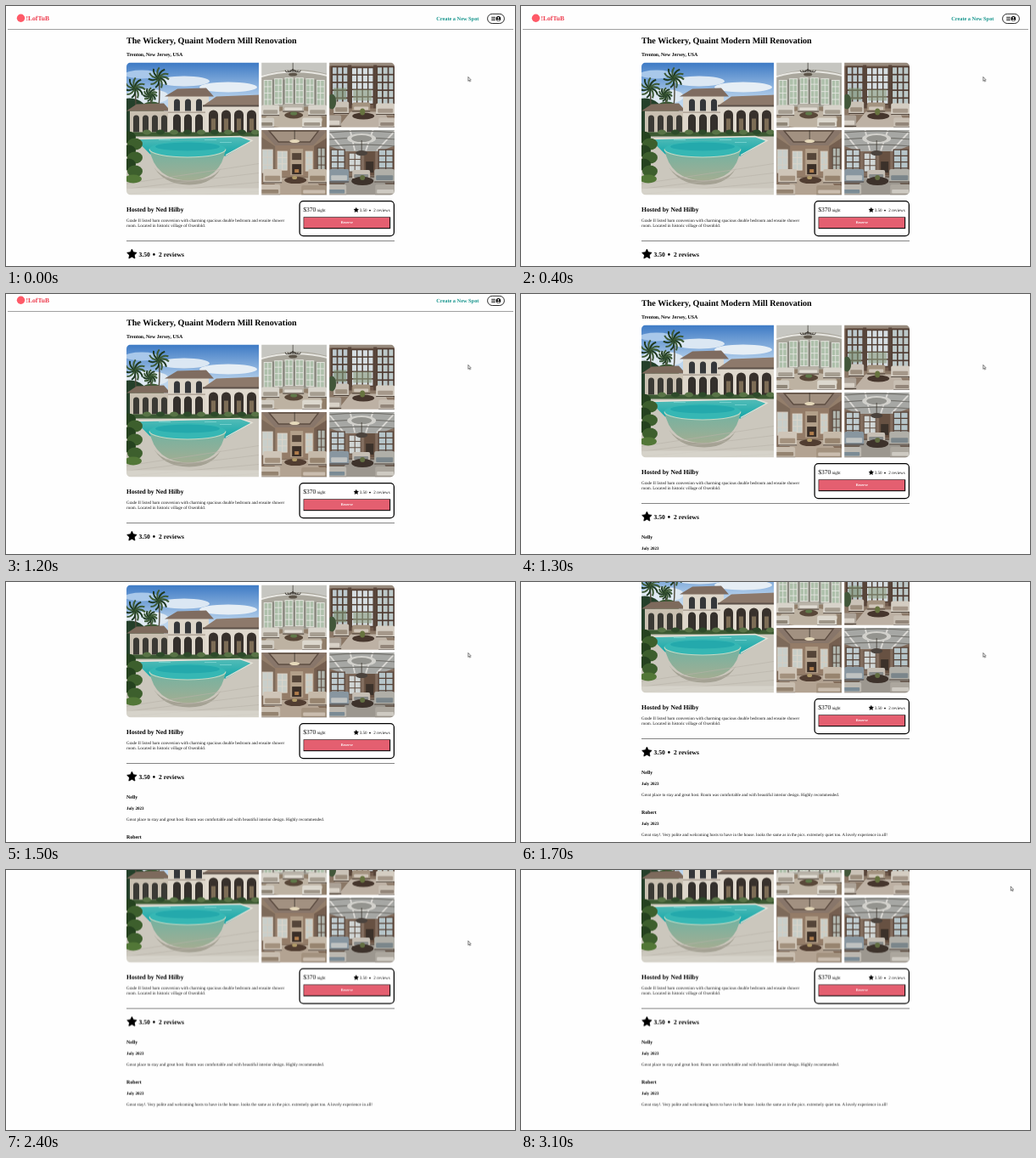
These frames come from a looping animation (600x306 px, 3.2 s). An HTML page:

```html
<!DOCTYPE html>
<html lang="en">
<head>
<meta charset="utf-8">
<title>Spot details</title>
<style>
  html, body { margin: 0; width: 100%; height: 100%; overflow: hidden; background: #fefefe; }
  svg { display: block; }
  text { font-family: "Liberation Serif", "Times New Roman", serif; text-rendering: geometricPrecision; white-space: pre; }
  .b { font-weight: bold; }
</style>
</head>
<body>
<script>
const LOOP = 3200;
const REM = 5.06;
const H1 = REM * 2, H2 = REM * 1.5, H3 = REM * 1.17;

const rect = (x, y, w, h, fill, extra = '') =>
  `<rect x="${x}" y="${y}" width="${w}" height="${h}" fill="${fill}" ${extra}/>`;
const oval = (x, y, rx, ry, fill) => `<ellipse cx="${x}" cy="${y}" rx="${rx}" ry="${ry}" fill="${fill}"/>`;
const path = (d, fill, extra = '') => `<path d="${d}" fill="${fill}" ${extra}/>`;
const line = (d, color, width = 1) => path(d, 'none', `stroke="${color}" stroke-width="${width}"`);
const text = (x, y, size, str, fill = '#111', cls = '') =>
  `<text x="${x}" y="${y}" font-size="${size}" fill="${fill}" class="${cls}">${str}</text>`;
const bold = (x, y, size, str, fill = '#000') => text(x, y, size, str, fill, 'b');
const repeat = (n, fn) => Array.from({ length: n }, (_, i) => fn(i)).join('');

function star(cx, cy, r) {
  const points = Array.from({ length: 10 }, (_, i) => {
    const a = i * Math.PI / 5 - Math.PI / 2, d = i % 2 ? r * 0.5 : r;
    return `${(cx + d * Math.cos(a)).toFixed(2)},${(cy + d * Math.sin(a)).toFixed(2)}`;
  });
  return `<polygon points="${points.join(' ')}" stroke="#000" stroke-width="${r * 0.14}" stroke-linejoin="round"/>`;
}

function panes(x, y, w, h, cols, rows, glass, frame, width = 1) {
  return rect(x, y, w, h, glass, `stroke="${frame}" stroke-width="${width}"`) +
    repeat(cols - 1, i => line(`M${x + w * (i + 1) / cols} ${y}v${h}`, frame, width)) +
    repeat(rows - 1, i => line(`M${x} ${y + h * (i + 1) / rows}h${w}`, frame, width));
}

const arch = (x, y, w, h, fill) =>
  path(`M${x} ${y + h}v${w / 2 - h}a${w / 2} ${w / 2} 0 0 1 ${w} 0v${h - w / 2}z`, fill);
const palm = (x, y, r, base) => line(`M${x} ${y}Q${x + 2} ${(y + base) / 2} ${x} ${base}`, '#4f4a3c', 1.4) +
  repeat(11, i => `<path d="M0 0Q${r * .6} -3 ${r} 2" transform="translate(${x} ${y}) rotate(${i * 33})"
    fill="none" stroke="${i % 2 ? '#1f3a22' : '#3d5a36'}" stroke-width="2"/>`);
const sofa = (x, y, w, h, fill, seat) =>
  rect(x, y, w, h, fill, 'rx="2"') + rect(x + 2, y + h * .45, w - 4, h * .35, seat, 'rx="1"') +
  rect(x, y + h * .9, w, 1, '#4a3d34');
const photo = (x, y, w, h, art) =>
  `<svg x="${x}" y="${y}" width="${w}" height="${h}"><g filter="url(#soft)">${art}</g></svg>`;

const villa = () =>
  rect(-3, -3, 162, 162, 'url(#sky)') +
  oval(18, 14, 20, 5, '#a9c8ea') + oval(68, 22, 30, 6, '#dbe7f3') + oval(120, 29, 34, 6, '#e6eef5') + oval(24, 40, 26, 9, '#dfe9f2') +
  oval(4, 62, 22, 20, '#24402a') + oval(30, 57, 14, 11, '#3a5833') +
  palm(10, 30, 12, 70) + palm(38, 18, 12, 52) + palm(28, 38, 8, 60) +
  rect(4, 57, 48, 28, '#c9c0b1') + path('M0 57L12 49 44 48 52 57z', '#7d6a5c') +
  repeat(4, i => arch(8 + i * 11, 62, 7, 20, '#3b3a35')) +
  rect(49, 38, 48, 47, '#ddd6ca') + path('M45 40L60 31 94 30 103 40z', '#7f6c60') +
  repeat(3, i => arch(56 + i * 13, 43, 7, 14, '#35373a') + arch(55 + i * 13, 61, 9, 24, '#34302c')) +
  rect(49, 58, 48, 1.4, '#aba094') +
  rect(93, 50, 66, 36, '#e0d9ce') + path('M90 51L106 40 159 38 159 51z', '#8d796b') +
  rect(90, 50, 69, 2, '#5c5049') +
  repeat(4, i => arch(97 + i * 15, 56, 11, 30, '#38312c') + rect(100 + i * 15, 66, 5, 14, '#7d6d56')) +
  rect(-3, 85, 162, 76, '#cbc7bd') + rect(-3, 82, 162, 5, '#3d5a33') +
  repeat(9, i => oval(24 + i * 16, 82, 5, 3, i % 2 ? '#2d4a2a' : '#587346')) +
  path('M10 90L134 87 148 92 117 110 28 108z', 'url(#water)') +
  line('M10 90L134 87 148 92 117 109', '#e6e2d8', 1.4) +
  repeat(5, i => line(`M${38 + i * 18} ${91 + i % 3 * 3}h14`, '#7ed6d3', .8)) +
  path('M27 101Q33 138 73 139Q112 138 117 101z', 'url(#tile)') +
  oval(72, 102, 45, 9.5, '#36b7b4') + oval(72, 99, 38, 5, '#24a9ac') +
  line('M27 102A45 9.5 0 0 0 117 102', '#c5d9c4', 1.2) +
  path('M30 119Q42 144 74 144Q104 144 114 119Q107 139 73 139Q39 139 30 119z', '#a5a294') +
  repeat(4, i => line(`M-2 ${143 + i * 6}L156 ${119 + i * 11}`, '#b8b3a8', .6)) +
  rect(-3, 148, 162, 12, '#dcd9d0', 'opacity=".7"') +
  repeat(6, i => oval(2 + i % 2 * 8, 88 + i * 8, 9, 7, i % 2 ? '#3d5f2d' : '#25421f')) +
  oval(8, 137, 10, 5, '#527737');

const sunroom = () =>
  rect(-3, -3, 84, 84, '#aaa79d') + path('M-2 -2H80V14Q38 2 -2 16z', '#c6c6c1') +
  line('M-2 17Q38 5 80 16', '#e8e7e2', 2) +
  repeat(6, i => panes(3 + i * 12.4, 22 - Math.sin((i + .5) * Math.PI / 6) * 4, 9, 30, 2, 4, '#aec0ab', '#e4e5df', .9)) +
  repeat(5, i => rect(12.8 + i * 12.4, 20, 2.2, 31, '#8a8980')) +
  line('M37 -2V9', '#4a4640', .8) +
  repeat(7, i => line(`M37 8Q${28 + i * 3} 14 ${28 + i * 3} 9`, '#4a4640', 1)) + oval(37, 14, 5, 2, '#5d554a') +
  rect(-3, 52, 84, 29, '#917f6b') + oval(38, 67, 34, 11, '#bdb2a2') +
  sofa(0, 50, 21, 13, '#d7d3ca', '#a59d91') + sofa(55, 50, 22, 13, '#d7d3ca', '#a59d90') +
  sofa(25, 49, 25, 9, '#b9b3a8', '#e0dcd3') +
  oval(38, 62, 11, 4, '#594839') + oval(38, 60, 4, 2, '#5f7849') +
  sofa(-3, 65, 18, 12, '#d0cbc1', '#8f8678') + sofa(48, 65, 23, 12, '#dcd8ce', '#a0978a');

const greatRoom = () =>
  rect(-3, -3, 84, 84, '#705a4c') + rect(-3, -3, 84, 7, '#978a7d') +
  panes(3, 5, 19, 46, 3, 5, '#bdc9ce', '#523f34', 1.7) + panes(26, 6, 26, 43, 4, 5, '#d6dee2', '#523f34', 1.5) +
  panes(56, 5, 20, 46, 3, 5, '#bcc8c8', '#503d33', 1.7) +
  rect(5, 30, 15, 14, '#7c8f70', 'opacity=".6"') + rect(28, 32, 22, 13, '#8c9d80', 'opacity=".6"') +
  rect(22, 3, 4, 52, '#58453a') + rect(52, 3, 4, 52, '#58453a') +
  rect(-3, 54, 84, 27, '#8a7766') + path('M8 79L25 58H65L75 79z', '#bdb1a4') +
  sofa(5, 46, 18, 15, '#cac2b7', '#9c8e7e') + sofa(55, 48, 22, 14, '#d4cdc2', '#a5988a') +
  sofa(27, 47, 21, 11, '#a39380', '#cfc5b9') + oval(40, 63, 13, 4, '#46362d') +
  sofa(-3, 62, 17, 14, '#aba196', '#d8d1c7') + sofa(58, 65, 20, 12, '#c8bfb3', '#93867a') +
  oval(39, 58, 3, 4, '#67733f') + oval(3, 46, 5, 9, '#42573a');

const lounge = () =>
  rect(-3, -3, 84, 84, '#937e6b') + path('M-2 -2H80L61 18H16z', '#88766a') +
  path('M9 1H67L57 14H20z', '#a29181') + line('M9 1H67L57 14H20z', '#5d4d42', 1.5) +
  rect(16, 18, 46, 36, '#947c68') + path('M-2 7L16 19V53L-2 62z', '#7d6a5a') + path('M80 7L62 19V53L80 62z', '#755f50') +
  panes(1, 23, 12, 27, 2, 3, '#c9cfcb', '#d5cdc2') + panes(19, 25, 11, 22, 2, 3, '#c8cec8', '#dcd5ca') +
  rect(34, 22, 15, 31, '#b3a08a') + rect(36, 27, 11, 8, '#554539') + rect(36, 40, 11, 12, '#3a2e27') +
  rect(39, 46, 5, 4, '#b07d4c') + panes(52, 25, 8, 23, 2, 3, '#c9cfc9', '#d6ccbe') +
  panes(66, 21, 9, 30, 2, 3, '#b0b5ad', '#57453a') + line('M39 0V12', '#3e352e', .8) + oval(39, 13, 6, 2, '#e5d8ba') +
  rect(-3, 55, 84, 26, '#826c5a') + path('M0 79L23 56H61L79 79z', '#b3a392') +
  sofa(2, 46, 22, 17, '#cfc5b8', '#a3917e') + sofa(55, 46, 22, 17, '#c5b9a9', '#97846f') +
  oval(40, 59, 13, 4, '#513d31') + oval(39, 56, 3, 2, '#b09a68') +
  sofa(-4, 64, 26, 13, '#c8bdaf', '#948370') + sofa(47, 65, 30, 12, '#a3927f', '#cabdaf');

const denRoom = () =>
  rect(-3, -3, 84, 84, '#826d5e') + path('M-2 -2H80V17L60 25H16L-2 18z', '#a6a7a4') +
  repeat(4, i => line(`M${-4 + i * 28} -2L${17 + i * 13} 24`, '#dcdad6', 1.8)) +
  repeat(3, i => line(`M-2 ${3 + i * 8}Q39 ${-1 + i * 8} 80 ${3 + i * 8}`, '#74736e', 1.2)) +
  oval(38, 10, 17, 6, '#d2d1cc') + oval(38, 10, 12, 4, '#94948f') +
  panes(2, 23, 16, 29, 2, 4, '#bfcbcf', '#574439', 1.3) + panes(23, 27, 14, 22, 2, 3, '#d0d5d4', '#604b3e') +
  rect(41, 25, 13, 28, '#675142') + rect(43, 37, 9, 13, '#3b312a') +
  panes(58, 23, 17, 29, 2, 4, '#b6c5c9', '#574439', 1.3) + line('M38 12V26', '#3b362f', .8) +
  oval(38, 27, 7, 3, '#4b433d') + rect(-3, 54, 84, 26, '#6c5e53') + path('M6 80L23 56H62L75 80z', '#9c978f') +
  sofa(0, 46, 23, 16, '#8896a0', '#bfc2c1') + sofa(53, 46, 24, 16, '#b0afa8', '#7b868b') +
  sofa(27, 47, 21, 11, '#c5beb4', '#888b8a') + oval(39, 60, 13, 5, '#3d322b') +
  sofa(-4, 64, 24, 13, '#bcb8b0', '#7b8b95') + sofa(54, 64, 24, 13, '#aca79e', '#cecac2') + oval(39, 56, 3, 3, '#626e42');

const header = `
  <circle cx="17.5" cy="14.3" r="4.7" fill="#ff5a68"/>
  ${bold(23.5, 17.2, H2, '!LofTuB', '#ee3b4d')}
  ${bold(507.2, 17.3, REM * 1.25, 'Create a New Spot', '#16958d')}
  ${rect(567.6, 9.3, 19.8, 11.2, '#fff', 'rx="5.6" stroke="#222" stroke-width=".95"')}
  ${repeat(3, i => rect(572.2, 12.8 + i * 1.8, 4.6, .8, '#000'))}
  <circle cx="580.4" cy="14.9" r="2.8"/><circle cx="580.4" cy="14" r="1" fill="#fff"/>
  ${path('M578.7 16.8q1.7-2 3.4 0q-1.7 1.3-3.4 0z', '#fff')}
  ${rect(2, 27, 596, 1, '#a0a0a0')}`;

const gallery = `<g clip-path="url(#frame)">
  ${photo(142, 66.5, 156, 156, villa())}
  ${photo(301.2, 66.5, 76.8, 76.2, sunroom())}${photo(381.2, 66.5, 76.8, 76.2, greatRoom())}
  ${photo(301.2, 146.1, 76.8, 76.4, lounge())}${photo(381.2, 146.1, 76.8, 76.4, denRoom())}</g>`;

const booking = `
  ${rect(346.1, 229.7, 111.3, 40.9, '#fff', 'rx="4.4" stroke="#000" stroke-width="1.26"')}
  ${text(350.2, 241.8, H2, '$370')}${text(366.4, 241.8, REM, 'night')}
  ${star(412.8, 240.2, 2.9)}${text(416.8, 242, REM, '3.50')}
  <circle cx="429" cy="240.6" r=".9"/>${text(433.2, 242, REM, '2 reviews')}
  ${rect(350.6, 248.3, 102.6, 13.9, '#1c1113')}
  ${rect(351.2, 248.9, 100.8, 12.1, '#e45f70')}
  ${bold(394.7, 256.1, REM * .833, 'Reserve', '#fff')}`;

const review = (y, name, words) =>
  bold(142, y, H3, name) + bold(142, y + 12.8, REM, 'July 2023') + text(142, y + 25.3, REM, words);

const page = header +
  bold(142, 44.1, H1, 'The Wickery, Quaint Modern Mill Renovation') +
  bold(142, 59, H3, 'Trenton, New Jersey, USA') + gallery +
  bold(142, 242.3, H2, 'Hosted by Ned Hilby') +
  text(142, 254.2, REM, 'Grade II listed barn conversion with charming spacious double bedroom and ensuite shower') +
  text(142, 259.9, REM, 'room. Located in historic village of Oxenfold.') +
  booking + rect(142, 276, 316, .8, '#666') +
  star(148.4, 292.2, 6) + bold(156.5, 294.7, H2, '3.50') + '<circle cx="174.4" cy="292.4" r="1.3"/>' +
  bold(180, 294.7, H2, '2 reviews') +
  review(318.3, 'Nelly', 'Great place to stay and great host. Room was comfortable and with beautiful interior design. Highly recommended.') +
  review(365.4, 'Robert', 'Great stay!. Very polite and welcoming hosts to have in the house. looks the same as in the pics. extremely quiet too. A lovely experience in all!');

document.body.innerHTML = `
<svg width="100%" height="100%" viewBox="0 0 600 306">
  <defs>
    <clipPath id="frame"><rect x="142" y="66.5" width="316" height="156" rx="5"/></clipPath>
    <filter id="soft" x="0" y="0" width="1" height="1"><feGaussianBlur stdDeviation=".5"/></filter>
    <linearGradient id="sky" x2="0" y2="1"><stop stop-color="#3574c2"/><stop offset=".3" stop-color="#bdd6ee"/></linearGradient>
    <linearGradient id="water" x2="0" y2="1"><stop stop-color="#55bdb8"/><stop offset="1" stop-color="#12a5a8"/></linearGradient>
    <linearGradient id="tile" x2="0" y2="1"><stop stop-color="#6fb3a3"/><stop offset="1" stop-color="#a3ad92"/></linearGradient>
  </defs>
  <g id="page">${page}</g>
  <g id="cursor"><path d="M.5.3V5.3L1.6 4.3 2.4 6.1 3.2 5.7 2.4 4H3.8z" fill="#fff" stroke="#333" stroke-width=".6"/></g>
</svg>`;

// Each row is [time, x, y]; a pose holds until the next row.
function play(id, rows) {
  const frames = [...rows, [LOOP, ...rows.at(-1).slice(1)]].map(([time, x, y]) => ({
    offset: time / LOOP, transform: `translate(${x}px, ${y}px)`, easing: 'step-end'
  }));
  document.getElementById(id).animate(frames, { duration: LOOP, iterations: Infinity });
}

play('page', [
  [0, 0, 0], [1200, 0, -7], [1300, 0, -30], [1400, 0, -47], [1500, 0, -63], [1600, 0, -78],
  [1700, 0, -92], [1800, 0, -102], [1900, 0, -109], [2000, 0, -113], [2100, 0, -113.5]
]);
play('cursor', [
  [0, 544.3, 83], [2600, 546, 80], [2700, 553, 66], [2800, 563, 45], [2900, 572, 28], [3000, 576.8, 19]
]);
</script>
</body>
</html>
```
